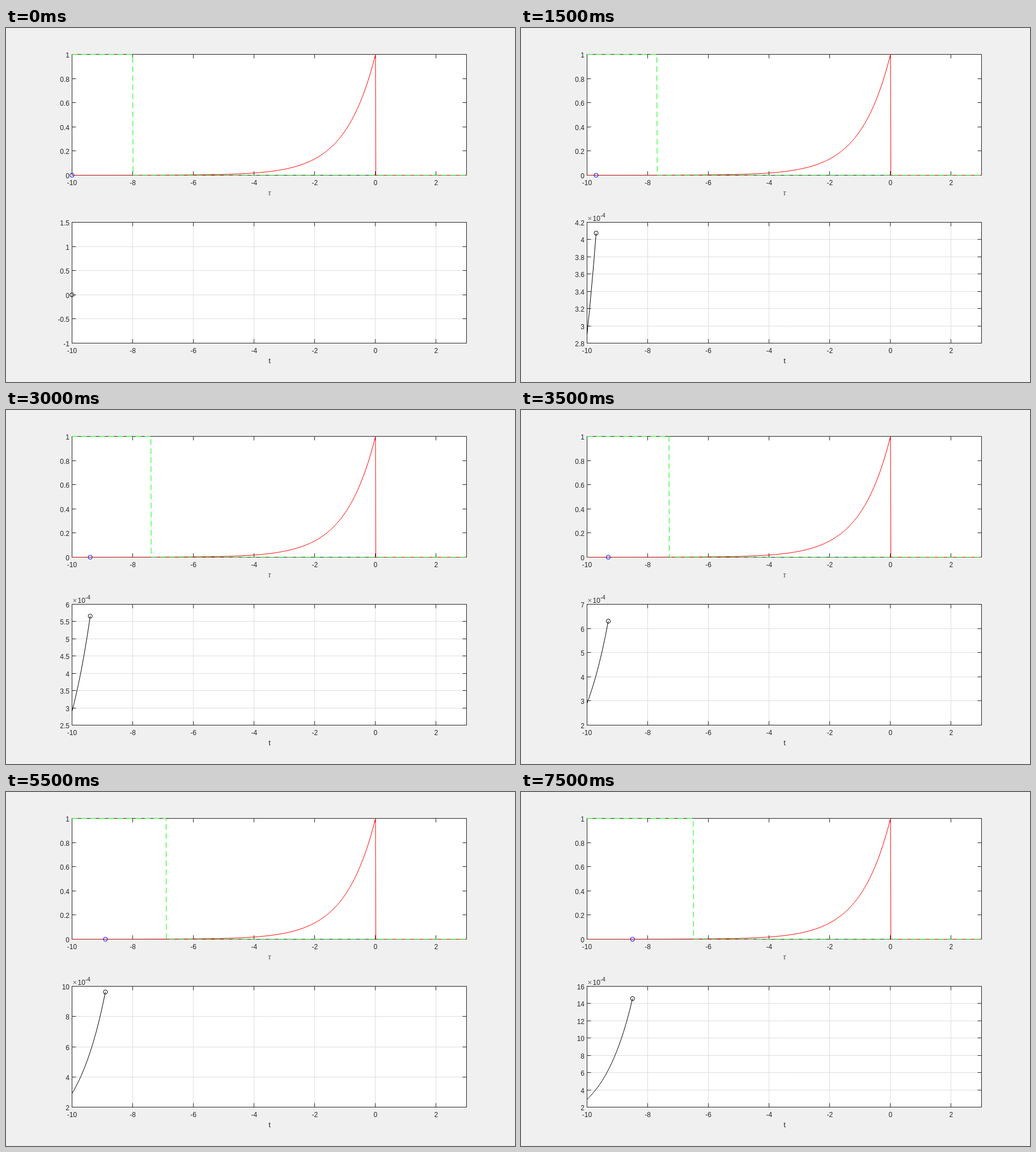
Animation, 898 px wide and 624 px high, one loop 8000 ms. Source, as an HTML page with a canvas:

```html
<!DOCTYPE html>
<html>
<head>
<meta charset="utf-8">
<style>
html, body { margin: 0; width: 100%; height: 100%; overflow: hidden; background: #f0f0f0; }
canvas { display: block; }
</style>
</head>
<body>
<canvas id="stage" width="898" height="624"></canvas>
<script>
const ctx = document.getElementById('stage').getContext('2d');
const LEFT = 116.5, RIGHT = 812.5, HEIGHT = 213, TOP1 = 46.5, TOP2 = 342.5;
const INK = '#262626', SANS = '"Liberation Sans", Arial, sans-serif';
const STEP_MS = 500, STEPS = 16;

const px = t => LEFT + (t + 10) * (RIGHT - LEFT) / 13;
const snap = v => Math.floor(v + 0.01) + 0.5;
// Convolution result, in units of 1e-4
const result = t => (Math.exp(t + 2) - Math.exp(-10)) * 1e4;

function stroke(points, color, width = 1, dash = []) {
  ctx.beginPath();
  points.forEach(([x, y]) => ctx.lineTo(x, y));
  ctx.strokeStyle = color;
  ctx.lineWidth = width;
  ctx.setLineDash(dash);
  ctx.stroke();
  ctx.setLineDash([]);
}

function circle(x, y, color) {
  ctx.beginPath();
  ctx.arc(x, y, 3.6, 0, 7);
  ctx.strokeStyle = color;
  ctx.lineWidth = 1;
  ctx.stroke();
}

function text(str, x, y, align = 'center', font = '12px ' + SANS, color = INK) {
  ctx.font = font;
  ctx.textAlign = align;
  ctx.fillStyle = color;
  ctx.fillText(str, x, y);
}

// Smallest 1-2-5 step that needs at most seven intervals
function autoScale(min, max) {
  for (const step of [0.05, 0.1, 0.2, 0.5, 1, 2, 5]) {
    const lo = Math.floor(min / step + 1e-9), hi = Math.ceil(max / step - 1e-9);
    if (hi - lo <= 7) return { lo: lo * step, hi: hi * step, step };
  }
}

function axes(top, { lo, hi, step }, grid) {
  const bottom = top + HEIGHT, n = Math.round((hi - lo) / step);
  ctx.fillStyle = '#fff';
  ctx.fillRect(LEFT, top, RIGHT - LEFT, HEIGHT);
  for (let t = -10; t <= 2; t += 2) {
    const x = snap(px(t));
    if (grid && t > -10) stroke([[x, top], [x, bottom]], '#dedede');
    stroke([[x, bottom], [x, bottom - 7]], INK);
    stroke([[x, top], [x, top + 7]], INK);
    text(t, px(t), bottom + 17);
  }
  for (let i = 0; i <= n; i++) {
    const y = snap(bottom - i * HEIGHT / n);
    if (grid && i > 0 && i < n) stroke([[LEFT, y], [RIGHT, y]], '#dedede');
    stroke([[LEFT, y], [LEFT + 7, y]], INK);
    stroke([[RIGHT, y], [RIGHT - 7, y]], INK);
    text(+(lo + i * step).toFixed(2), 112, y + 5, 'right');
  }
  ctx.strokeStyle = INK;
  ctx.lineWidth = 1;
  ctx.strokeRect(LEFT, top, RIGHT - LEFT, HEIGHT);
}

function drawSignals(t) {
  const base = TOP1 + HEIGHT, decay = [];
  axes(TOP1, { lo: 0, hi: 1, step: 0.2 }, false);
  for (let i = -200; i <= 0; i++) decay.push([px(i / 20), base - HEIGHT * Math.exp(i / 20)]);
  decay.push([px(0.01), base], [RIGHT, base]);
  stroke(decay, '#f00');
  stroke([[LEFT, TOP1], [px(t + 2), TOP1], [px(t + 2.01), base], [RIGHT, base]], '#0f0', 1, [10, 6]);
  stroke([[LEFT, base], [RIGHT, base]], 'rgba(38,38,38,.3)');
  circle(px(t), base, '#00f');
  text('τ', 465, 295, 'center', 'italic 15px "Liberation Serif", serif', '#555');
}

function drawResult(step) {
  const scale = step ? autoScale(result(-10), result(-10 + step / 10)) : { lo: -1, hi: 1.5, step: 0.5 };
  const py = v => TOP2 + HEIGHT * (scale.hi - v) / (scale.hi - scale.lo);
  axes(TOP2, scale, true);
  text('t', 465, 591, 'center', '13.3px ' + SANS);
  if (!step) return circle(LEFT, py(0), '#000');

  text('×', 117.5, 340, 'left', '13px ' + SANS, '#666');
  text('10', 126.5, 340, 'left');
  text('-4', 140, 334, 'left', '10px ' + SANS);
  const curve = [];
  for (let i = 0; i <= step; i++) curve.push([px(-10 + i / 10), py(result(-10 + i / 10))]);
  stroke(curve, '#000');
  circle(...curve[step], '#000');
}

function frame() {
  const step = Math.floor(performance.now() / STEP_MS) % STEPS;
  ctx.fillStyle = '#f0f0f0';
  ctx.fillRect(0, 0, 898, 624);
  drawSignals(-10 + step / 10);
  drawResult(step);
  requestAnimationFrame(frame);
}
frame();
</script>
</body>
</html>
```
